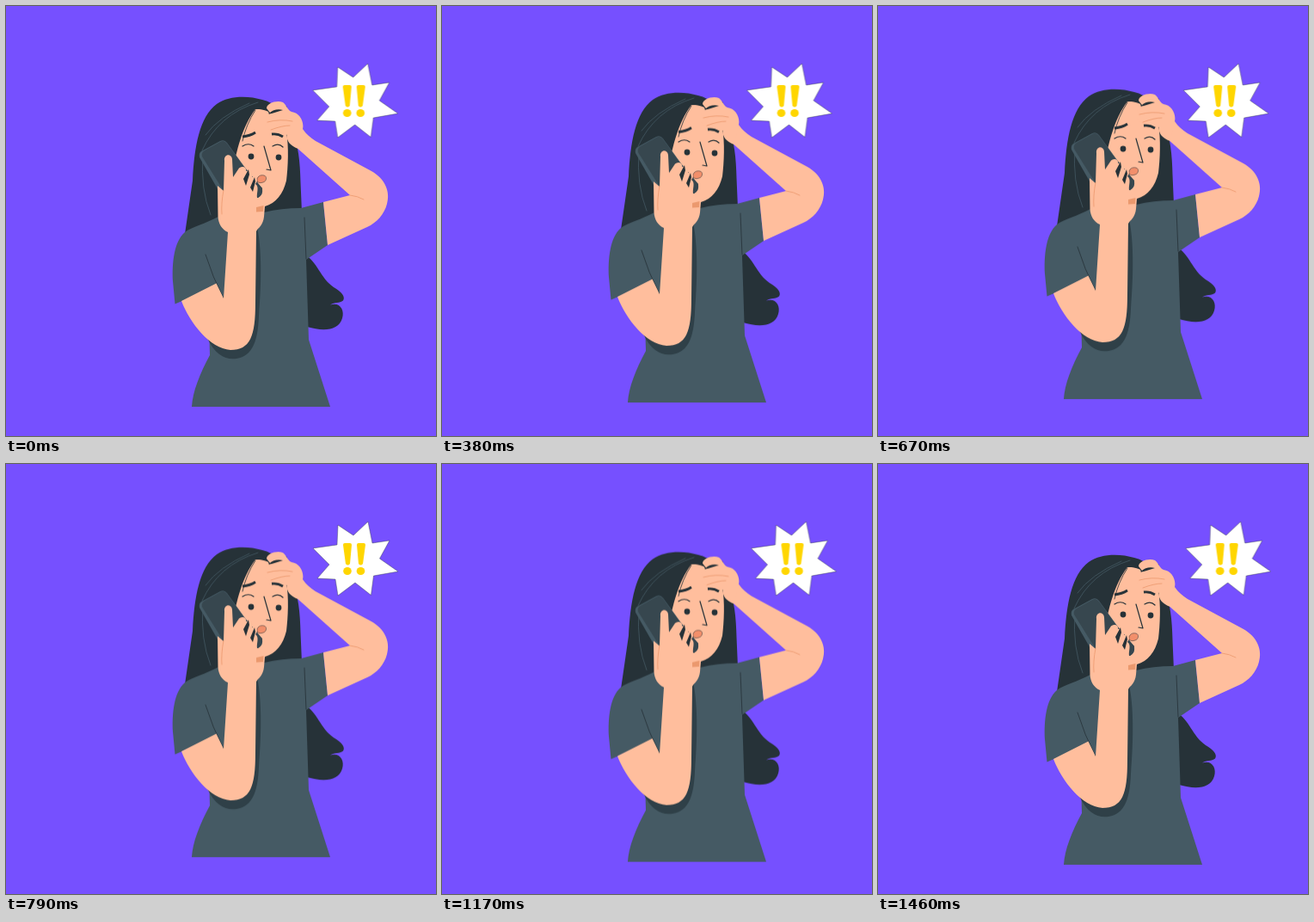
Animation of 500 by 500 pixels, one loop 1.5 s. Source, as an HTML page:

```html
<!DOCTYPE html>
<html lang="en">
<head>
<meta charset="utf-8">
<title>Worried call</title>
<style>
html, body { margin: 0; width: 100%; height: 100%; overflow: hidden; background: #7650ff; }
svg { display: block; width: 100vw; height: 100vh; }
.hair { fill: #263238; }
.shirt { fill: #455a64; }
.shade { fill: #2f4048; }
.skin { fill: #ffbe9d; }
.line { fill: none; stroke: #263238; stroke-width: .8; stroke-linecap: round; stroke-linejoin: round; }
.strand { stroke: #455a64; }
.crease { stroke: #eb996e; }
.lid { stroke-width: 1.2; }
.brow { stroke-width: 2.8; stroke-linecap: butt; }
#woman, #brows, #burst { animation: bob 1.5s cubic-bezier(.36, 0, .64, 1) infinite; }
#brows { animation-name: lift; }
#burst { animation-name: shake; }
@keyframes bob { 48% { transform: translateY(-9px); } }
@keyframes lift { 48% { transform: translateY(-1px); } }
@keyframes shake {
  0% { transform: none; }
  5.3%, 27.5%, 47.7%, 68.3%, 90.7% { transform: translateX(-3px); }
  16%, 37.7%, 58%, 80.3% { transform: translateX(3px); }
  100% { transform: translateX(1.5px); }
}
</style>
</head>
<body>
<svg viewBox="0 0 500 500">
  <g id="woman">
    <!-- hair behind the body -->
    <path class="hair" d="M208 265L217 203C219 163 225 129 245 114C259 104 281 104 298 109C312 112 326 124 333 144C340 162 342 182 342.500 205L344 240L300 256L240 264Z"/>
    <path class="hair" d="M346 288C363 298 365 316 381 327C390 332 395 338 392 342.500C388 346 382 344 377 347.500C388 344 394 353 391 363C387 377 370 379 350 373Z"/>
    <path class="line strand" d="M293 112Q247 126 228 168M283 113Q247 129 232 150M229 174Q226 213 238 243"/>

    <!-- shirt -->
    <path class="shirt" d="M247 245C232 253 216 257 208 263C195 274 193 300 194 320L196.500 346.500L235 330L237 406C225 428 217 449 216 466H377L352 388L349 295L374 278L369 228L343 235Q320 235 300 240L280 262Z"/>
    <path class="line" d="M347 246L349 294M232 289Q240 315 253 340"/>
    <path class="shade" d="M234 386C243 406 256 412 268 410C287 407 293 389 294 360C297 322 298 281 291 252L270 300Z"/>

    <!-- face -->
    <path class="skin" d="M290 120C301 119 316 125 326 146C329 164 328 187 326 203C322 219 314 229 301 233L300 245C299 254 294 259 289 262H262L264 190C268 170 274 141 290 120Z"/>
    <path class="line" d="M290 121Q279 138 275 157"/>
    <g id="brows">
      <path class="line brow" d="M275 152Q284 151 290 147M309 149Q316 148 322 152"/>
    </g>
    <path class="line lid" d="M275 163Q282 158.500 288 163M310 163Q317 159 322 164"/>
    <circle class="hair" cx="285" cy="175" r="3.4"/>
    <circle class="hair" cx="317" cy="176" r="3.4"/>
    <path class="line lid" d="M300 163L308 191L303 190"/>
    <path class="line" style="fill:#f28f6b;stroke-width:.5" d="M292 204C291 198 296 196 300 197C304 198 303 204 299 205C296 206 294 206 292 204Z"/>

    <!-- arm raised to the forehead -->
    <path class="skin" d="M345 143C349 149 354 153 360 157L425 192C441 201 447 216 443 230C440 242 431 252 420 257L374 278L369 228L400 220L339.500 166C330 162 326 157 327 150Z"/>
    <path class="line crease" d="M400 220Q409 221 416 225"/>
    <path class="hair" d="M304 118L326 116L330 128L307 131Z"/>
    <path class="skin" d="M303 119C303 113 315 109 322 112C326 115 328 122 332 123C341 124 347 134 345 143L340 165C331 162 326 156 327 150C322 147 316 144 309 144C302 143 300 139 303 135C300 130 303 126 309 125L322 121C316 119 310 121 307 124Z"/>
    <path class="line crease" d="M304 135Q319 131 333 134M308 144Q321 139 330 139"/>

    <!-- phone and the arm that holds it -->
    <path class="shirt" d="M227 169L249 157Q254 155 257 159L278 188L298 212Q299 220 293 223L253 221Q248 218 245 211L225 176Q224 171 227 169Z"/>
    <path d="M231 168L250 157.500Q254 156 257 160L278 189L298 212Q299 220 293 223L253 215L228 175Q227 170 231 168Z" fill="#37474f"/>
    <path class="skin" d="M246 209L253 215L254 180C253 172 262 171 263 178L264 199L270 190C273 185 280 187 279 192C284 191 288 195 286 199C291 198 294 203 290 207C295 210 291 218 292 223C301 231 301 242 297 251L291 262L290 345C290 384 284 400 261 400C237 398 214 369 204 343L244.500 322.500L253 340L258 263C251 260 247 253 246.500 245Z"/>
    <path class="line crease" d="M253 214Q250 230 251 242"/>
    <path class="hair" d="M276 201L282 190L283 196L279 209ZM284 211L289 199L290 204L287 216Z"/>
    <path d="M291 234L299.500 232L299 239L291 239.500Z" fill="#eb996e"/>
  </g>

  <g id="burst">
    <path d="M386 71L404 83L421 67L426 92L446 89L434.500 110L456 125L427.500 130L424.500 152.500L406 138L386 153L383 134L362 133L376 117L357 98L385 94Z" fill="#fff" stroke="#263238" stroke-width=".4"/>
    <g fill="#ffd600">
      <path d="M392 94Q392 92 394 92H400Q402 92 402 94L400 116Q397.500 119 395 116ZM408 94Q408 92 410 92H416Q418 92 418 94L415 116Q412.500 119 410 116Z"/>
      <ellipse cx="397" cy="124.500" rx="4.800" ry="4.500"/>
      <ellipse cx="412.500" cy="124.500" rx="4.800" ry="4.500"/>
    </g>
  </g>
</svg>
</body>
</html>
```
